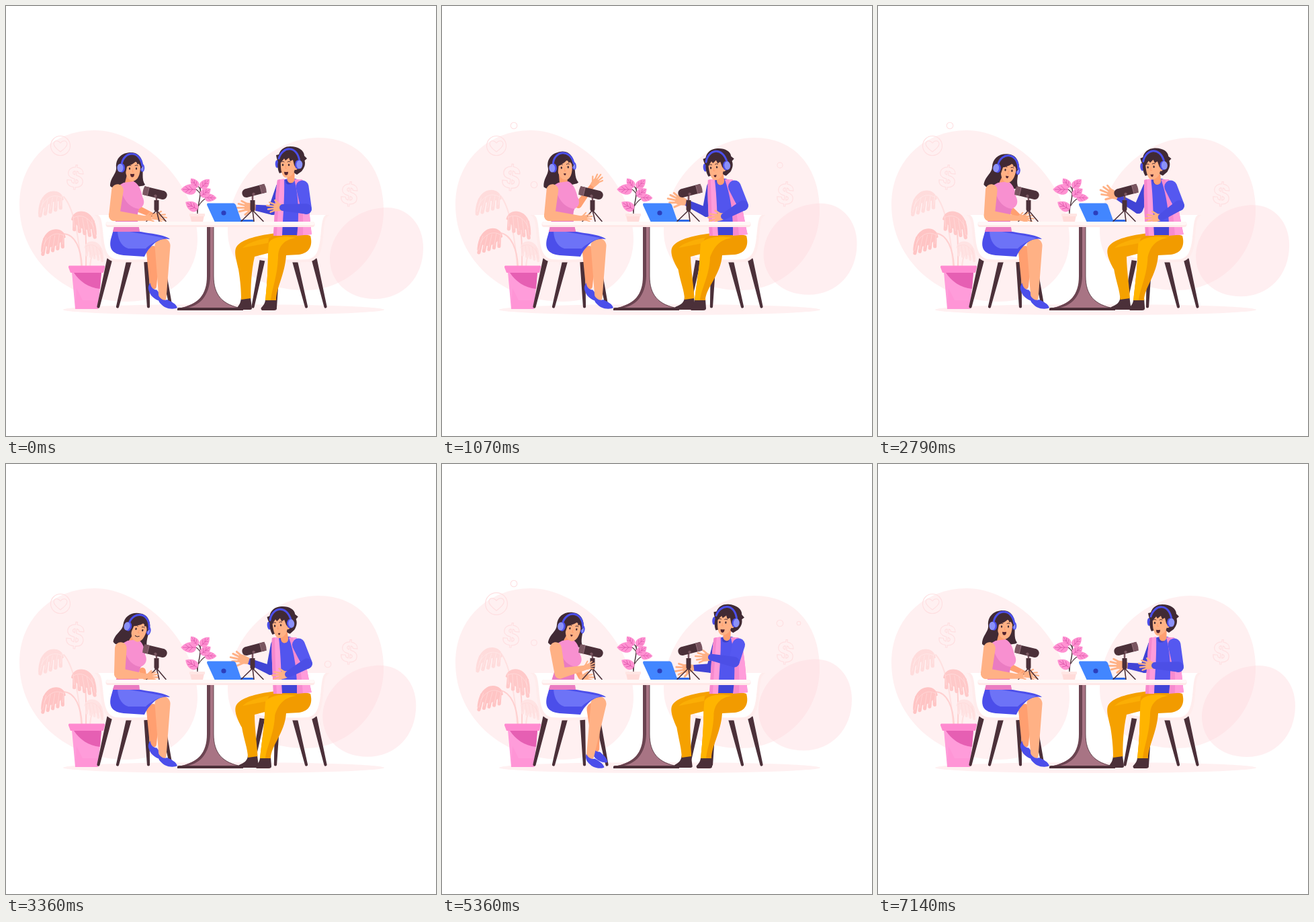
Recreate the animation shown at these times as an HTML page with a canvas. Size 640 px wide and 640 px high, loop 7.21 s.

```html
<!DOCTYPE html>
<html lang="en">
<head>
<meta charset="utf-8">
<title>Podcast</title>
<style>
html, body { margin: 0; width: 100%; height: 100%; overflow: hidden; background: #fff; }
canvas { display: block; width: 640px; height: 640px; }
</style>
</head>
<body>
<canvas id="stage" width="640" height="640"></canvas>
<script>
const canvas = document.getElementById('stage');
const ctx = canvas.getContext('2d');
const ratio = window.devicePixelRatio || 1;
canvas.width = canvas.height = Math.round(640 * ratio);

const LOOP = 7210, STEP = LOOP / 101;
const DARK = '#4b3039', HAIR = '#412a34', SKIN = '#ffb185', SKIN2 = '#ff9f70';
const BLUE = '#4b4eea', BLUE2 = '#4144d6', LILAC = '#8b91f9';
const PINK = '#ff9cda', PINK2 = '#ea7cc2', MIST = '#fff0f1', LINE = '#ffdfe1';

// ---------- drawing helpers ----------
function fill(color, path) {
  ctx.fillStyle = color;
  ctx.fill(new Path2D(path));
}

function stroke(color, width, path) {
  ctx.strokeStyle = color;
  ctx.lineWidth = width;
  ctx.stroke(new Path2D(path));
}

function oval(color, x, y, rx, ry = rx, turn = 0) {
  ctx.fillStyle = color;
  ctx.beginPath();
  ctx.ellipse(x, y, rx, ry, turn, 0, 7);
  ctx.fill();
}

function at(x, y, turn, scale, draw) {
  ctx.save();
  ctx.translate(x, y);
  ctx.rotate(turn);
  ctx.scale(scale, scale);
  draw();
  ctx.restore();
}

// A round-ended bar whose thickness changes along its length
function taper(color, [x1, y1], r1, [x2, y2], r2) {
  const a = Math.atan2(y2 - y1, x2 - x1) + Math.PI / 2;
  const c = Math.cos(a), s = Math.sin(a);
  ctx.fillStyle = color;
  ctx.beginPath();
  ctx.moveTo(x1 + c * r1, y1 + s * r1);
  ctx.arc(x1, y1, r1, a, a + Math.PI);
  ctx.lineTo(x2 - c * r2, y2 - s * r2);
  ctx.arc(x2, y2, r2, a + Math.PI, a);
  ctx.closePath();
  ctx.fill();
}

// Slides the upper body sideways while its foot line stays put
function leaning(dx, base, height, draw) {
  const k = dx / height;
  ctx.save();
  ctx.transform(1, 0, -k, 1, k * base, 0);
  draw();
  ctx.restore();
}

function hand([x, y], turn, scale, flip = 1) {
  at(x, y, turn, scale, () => {
    ctx.scale(1, flip);
    fill(SKIN, 'M-1 -3 C4 -4.500 8 -4.500 10 -3 L10 4 C7 5 3 4 -1 3Z');
    for (let i = 0; i < 4; i++) {
      const a = (i - 1.3) * 0.24;
      const len = 18 - Math.abs(i - 1.2) * 2;
      stroke(SKIN, 1.9, `M8 ${i * 2 - 2.7} L${Math.cos(a) * len} ${Math.sin(a) * len}`);
    }
    stroke(SKIN, 2, 'M3 -2.500 L9 -7.500');
  });
}

function mouth(x, y, open) {
  if (open < 0.12) return stroke(HAIR, 1, `M${x - 3} ${y} Q${x} ${y + 2} ${x + 3} ${y - 0.5}`);
  const w = 1.4 + 1.6 * open, h = 1.2 + 1.1 * open;
  fill('#55252f', `M${x - w} ${y - h} Q${x} ${y - h + 0.8} ${x + w} ${y - h} Q${x + w} ${y + h * 1.2} ${x} ${y + h * 1.2} Q${x - w} ${y + h * 1.2} ${x - w} ${y - h}Z`);
}

function face(x1, x2, y) {
  for (const x of [x1, x2]) {
    oval(HAIR, x, y, 1.2, 1.7);
    stroke(HAIR, 0.9, `M${x - 2} ${y - 4.5} Q${x} ${y - 6} ${x + 2} ${y - 4.5}`);
  }
  const m = (x1 + x2) / 2;
  stroke(SKIN2, 1, `M${m} ${y + 1} L${m - 1} ${y + 5} L${m + 1} ${y + 5}`);
}

// ---------- poses ----------
const mix = (a, b, u) => Array.isArray(a) ? a.map((v, i) => mix(v, b[i], u)) : a + (b - a) * u;
const smooth = u => u * u * (3 - 2 * u);
const TIMES = [0, 1070, 2070, 3360, 4430, 6210, 7140];

function segment(t, times) {
  let i = 0;
  while (i < times.length - 2 && t >= times[i + 1]) i++;
  return [i, Math.min(1, Math.max(0, (t - times[i]) / (times[i + 1] - times[i])))];
}

function poseAt(t, poses) {
  const [i, u] = segment(t, TIMES);
  const a = poses[i], b = poses[i + 1], out = {};
  for (const k in a) out[k] = mix(a[k], b[k], smooth(u));
  return out;
}

const wRest = {
  lean: 0, head: [187, 244, 0], mouth: 1,
  elbow: [161, 312], wrist: [206, 316], turn: -0.1,
  elbow2: [193, 300], wrist2: [219, 312], turn2: 0.22,
  foot: [233, 434, 0], foot2: [219, 417, 0.4], knee2: [219, 367]
};
const wPoint = { ...wRest, lean: -2, head: [181, 242.5, -0.1], mouth: 0.2,
  elbow: [160, 312], elbow2: [203, 296], wrist2: [224, 267], turn2: -0.85 };
const wListen = { ...wRest, lean: 6, head: [196, 248, 0.22], mouth: 0,
  elbow: [169, 312], wrist: [208, 316], elbow2: [203, 308], wrist2: [206, 317], turn2: 0.1 };
const wTouch = { ...wListen, lean: 4, head: [192, 246, 0.11],
  elbow: [184, 311], wrist: [214, 290], turn: -0.65, wrist2: [206, 317],
  foot: [219, 435, 0.08], foot2: [235, 428, 0.35], knee2: [227, 365] };
const wAnswer = { ...wListen, lean: 4, head: [194, 248, 0.18], mouth: 0.3, elbow: [168, 312],
  foot: [222, 435, 0.06], foot2: [224, 420, 0.2], knee2: [224, 365] };
const WOMAN = [wRest, wPoint, wRest, wListen, wTouch, wAnswer, wRest];

const mRest = {
  lean: 0, head: [420, 240, 0], mouth: 1,
  elbow: [447, 302], wrist: [412, 300], turn: 3.2,
  elbow2: [397, 304], wrist2: [370, 300], turn2: 3.2,
  ankle: 394, ankle2: 357
};
const mLean = { ...mRest, lean: -8, head: [408.5, 243.5, -0.12], mouth: 0.35,
  elbow: [448, 297], wrist: [420, 313], turn: 3,
  elbow2: [394, 307], wrist2: [362, 292], turn2: 3.42, ankle: 384, ankle2: 368 };
const mRaise = { ...mLean, lean: -7, head: [412, 242, -0.06], mouth: 0.9,
  wrist: [424, 316], elbow2: [378, 295], wrist2: [350, 270], turn2: 3.8, ankle: 391 };
const mPause = { ...mLean, mouth: 0.15, wrist2: [360, 293], ankle: 386, ankle2: 367 };
const mOpen = { ...mRest, lean: -3, head: [416, 241, -0.05],
  wrist: [412, 303], turn: 2.85, wrist2: [368, 298], ankle: 392, ankle2: 360 };
const mReach = { ...mRest, lean: 4, head: [425.7, 238, 0.18],
  elbow: [424, 288], wrist: [391, 274], turn: 3.4,
  elbow2: [404, 304], wrist2: [378, 308], turn2: 2.85, ankle2: 367 };
const MAN = [mRest, mLean, mRaise, mPause, mOpen, mReach, mRest];

// ---------- backdrop ----------
function pulse(t, from, to) {
  return smooth(Math.max(0, Math.min(1, (t - from) / 300, (to - t) / 300)));
}

function ring(x, y, r) {
  if (r < 0.2) return;
  ctx.strokeStyle = LINE;
  ctx.lineWidth = 1.1;
  ctx.beginPath();
  ctx.arc(x, y, r, 0, 7);
  ctx.stroke();
}

function dollar(x, y, turn, scale) {
  at(x, y, turn, scale, () => {
    ctx.font = '800 40px Inter, "Liberation Sans", sans-serif';
    ctx.textAlign = 'center';
    ctx.textBaseline = 'alphabetic';
    ctx.strokeStyle = LINE;
    ctx.lineWidth = 1.2;
    ctx.strokeText('$', 0, 14.5);
  });
}

function backdrop(t, sway) {
  fill(MIST, 'M132 185 C198 185 283 257 285 346 C285 406 238 439 180 440 C92 440 20 380 20 295 C20 230 70 185 132 185Z');
  fill(MIST, 'M465 196 C525 196 562 240 562 305 C562 370 510 423 445 423 C380 423 330 390 330 335 C330 260 395 196 465 196Z');
  const [i, u] = segment(t, [0, 4700, 7140]);
  const drift = i ? -15 * (1 - u) : -15 * u;
  at(551 + drift, 368 - 9.5 * sway, 0, 1, () =>
    fill('rgba(255, 214, 219, 0.38)', 'M16 -68 C48 -68 70 -42 70 -8 C70 36 40 68 -2 68 C-42 68 -69 42 -69 8 C-69 -32 -30 -68 16 -68Z'));

  const swell = pulse(t, 4050, 6700);
  at(81, 208, 0, 1 + 0.13 * swell, () => {
    ring(0, 0, 14.5);
    stroke(LINE, 1.1, 'M0 9 C-7 4 -10 0 -10 -3 C-9 -9 -3 -8 0 -4 C3 -8 9 -9 10 -3 C10 0 7 4 0 9Z');
  });
  dollar(103, 255, 0.1, 1 + 0.08 * (pulse(t, 500, 1600) + pulse(t, 2900, 3800)));
  dollar(511, 280, 0.1, 1 + 0.08 * pulse(t, 1600, 2600));

  const early = pulse(t, 300, 1500), late = swell;
  const top = Math.max(early, pulse(t, 2450, 3130), late);
  ring(107, 178, 4.8 * top);
  ring(137, 266, 4.8 * Math.max(early, late * 0.9));
  ring(503, 237, 4.8 * Math.max(early * 0.85, late));
  ring(531, 237, 2.8 * late);
  ring(73, 246, 4.2 * pulse(t, 1650, 2400));
  ring(545, 274, 4.8 * pulse(t, 1650, 2500));
  ring(479, 298, 4.8 * pulse(t, 2950, 3850));
  oval(MIST, 324, 452, 239, 8);
}

// An arched leaf with fingers hanging from its upper edge
function bigLeaf(x, y, turn, size, flip, color, vein, full) {
  at(x, y, turn, size, () => {
    ctx.scale(flip, 1);
    fill(color, 'M20 -7 C18 -20 4 -24 -7 -17 C-17 -10 -20 3 -20 17 C-14 6 -6 0 2 -3 C8 -5 15 -4 20 -7Z');
    if (full) oval(color, 0, -4, 17, 11, -0.5);
    for (let i = 0; i < 5; i++) {
      const fx = -14 + 7.2 * i, ex = -17 + 8 * i, ey = 18 - 3 * i + full * 2;
      stroke(color, 5.6, `M${fx} ${-4 - 2 * i} Q${fx} ${ey * 0.3} ${ex} ${ey}`);
      stroke(vein, 0.7, `M${fx + 2} ${-7 - 1.5 * i} L${ex} ${ey - 4}`);
    }
    stroke(vein, 0.8, 'M17 -10 C6 -17 -8 -12 -15 4');
  });
}

function pottedPlant(s) {
  stroke('#ffe0e0', 2, `M${86 + 2 * s} ${284 - 2 * s} Q105 305 112 388`);
  stroke('#ffd0d0', 2, `M${86 + s} ${339 - 2 * s} C103 340 112 362 113 388`);
  stroke('#ffd0d0', 2, `M${117 - 3 * s} 312 Q120 350 119 388`);
  stroke('#ffe0e0', 2, 'M138 356 Q126 367 125 388');
  bigLeaf(131, 365, 0, 0.72, -1, '#ffe3e3', '#ffd5d5', 1);
  bigLeaf(67 + 3.5 * s, 295 - 3 * s, 0.08 * s, 0.95, 1, '#ffdcdc', '#ffeaea', 0);
  bigLeaf(116 - 3 * s, 325, 0.08 * s, 0.95, -1, '#ffc9c9', '#ffdede', 1);
  bigLeaf(70.5 + 1.5 * s, 351 - 2.5 * s, 0.08 * s, 0.92, 1, '#ffc4c4', '#ffdcdc', 1);
  fill(PINK, 'M98 396 H142 L137 451 H103Z');
  fill('#ff95d6', 'M105 420 L114 438 H139 L137 451 H103Z');
  fill('#e65fb3', 'M101 397 H142 L140 421 C122 419 110 410 101 397Z');
  fill('#ff8ad0', 'M94 386.5 H146 Q148 387 147 389 L145 397 H96 L93 389 Q92.500 387 94 386.500Z');
}

// ---------- furniture ----------
function chair(mirrored) {
  ctx.save();
  if (mirrored) ctx.transform(-1, 0, 0, 1, 613, 0);
  for (const [x, y, x2] of [[154, 378, 137.5], [183.5, 378, 166], [209, 376, 212], [231, 376, 245.5]])
    taper(DARK, [x, y], 4, [x2, 447.5], 2.1);
  fill('#ffecec', 'M131 311 H175 V360 L240 367 Q243 374 236 378 C215 382 185 382 163 381 C148 379 143 366 141 345 C139 326 140 315 131 311Z');
  fill('#fff', 'M137 311 H175 V360 L239 367 Q239 372 234 374 C212 378 185 378 164 377 C151 375 147 363 145 344 C143 326 143 315 137 311Z');
  ctx.restore();
}

function tableLeg() {
  fill('#a87484', 'M300 328 H309 V402 C309 430 322 445 352 450 H256 C286 445 300 430 300 402Z');
  fill('#6b4451', 'M299 328 H304 V402 C303 432 288 447 266 450 H256 C286 445 299 430 299 402Z');
  stroke(DARK, 0.8, 'M309 329 V402 C309 430 322 445 351 450');
  fill(DARK, 'M255 450 Q256 449 258 449 H350 L353 451 V453 H255Z');
}

function tableTop() {
  fill('#ffe9e8', 'M152 321 H456 Q459.500 321 459.500 325 Q459.500 329 456 329 H152 Q148.500 329 148.500 325 Q148.500 321 152 321Z');
  fill('#fff8f7', 'M152 321 H456 Q459 321 459 324 L458 326 H150 L149 324 Q149 321 152 321Z');
}

function tripod(x, feet) {
  for (const f of feet) stroke(DARK, 1.6, `M${x} 304 L${f} 320.500`);
  fill(DARK, `M${x - 3.5} 289 H${x + 3.5} V303 L${x + 2} 306 H${x - 2} L${x - 3.5} 303Z`);
  stroke('#7a5661', 2.6, `M${x} 282 V288`);
}

function micBody(x, y, turn, mirrored) {
  at(x, y, turn, 1, () => {
    if (mirrored) ctx.scale(-1, 1);
    fill(DARK, 'M-17 -6.500 H13 Q18.500 -5 18.500 0 Q18.500 5 13 6.500 H-17Z');
    fill('#7a5661', 'M-17 -6.500 H-10 V6.500 H-17 Q-19 0 -17 -6.500Z');
    stroke('#9c7682', 0.8, 'M-10 -6 V6');
    oval('#7a5661', 2, 4, 2.2);
  });
}

function laptop() {
  fill('#2e69e6', 'M346 318 H367 Q370 319 368.500 322 H345Z');
  fill('#4286ff', 'M300 293.500 H339 Q341 294 342 296 L351 322 H311 L299 296 Q299 294 300 293.500Z');
  oval('#2c3fbd', 324, 308, 3.6);
}

function deskPlant() {
  stroke(DARK, 1.4, 'M285 310 C284 297 291 287 289 270');
  stroke(DARK, 1.1, 'M287 297 Q291 290 298 286 M289 280 Q286 274 281 272 M289 273 L286 268 M290 278 L293 274 M285 306 L283 302');
  const leaves = [[285, 270, -2.2, 0.95], [290, 271, -0.8, 1.05], [283, 273, 3.14, 1.3],
    [290, 283, -0.65, 1.05], [296, 285, 0.05, 1], [285, 303, 3.7, 1.2]];
  for (const [x, y, turn, scale] of leaves) at(x, y, turn, scale, () => {
    fill('#ff92d2', 'M0 0 C0 -8 11 -8 17.500 0 C11 8 0 8 0 0Z');
    stroke('#df5aae', 0.7, 'M0 0 H15 M4 0 L8 -4 M4 0 L8 4 M8 0 L12 -3 M8 0 L12 3');
  });
  fill('#ffdcda', 'M274 312 H295 L293 321 H276Z');
  fill('#ffe6e4', 'M273 309 H296 V313 H273Z');
}

// ---------- people ----------
function shoe([x, y, turn]) {
  at(x, y, turn, 1, () =>
    fill(BLUE, 'M-6 -3 C-8 5 -4 9 3 14 C11 18 19 17 22 15 C20 9 13 6 7 3 C1 5 -3 2 -6 -3Z'));
}

function womanLegs(p) {
  taper(SKIN2, p.knee2, 10, p.foot2, 5);
  shoe(p.foot2);
  taper(SKIN, [233, 357], 11.5, p.foot, 5.6);
  shoe(p.foot);
  fill(BLUE, 'M160 333 C180 332 198 336 212 338 C228 340 240 343 244 347 C234 345 224 349 217 357 C211 363 209 367 206 373 L175 371 C158 369 153 361 156 347Z');
  fill('#6d73f7', 'M166 333 C182 336 206 339 236 345.500 C224 349 214 355 208 361 L182 361 C170 357 166 345 166 333Z');
}

function womanHead(p) {
  at(p.head[0], p.head[1], p.head[2], 1, () => {
    oval(BLUE, 16, -3, 3.2, 6);
    oval(LILAC, 16, -3, 1.6, 4.6);
    fill(SKIN, 'M-10 -8 C-10 7 -6 16 2 16.500 C9 16 13 7 13 -5 C10 -15 -7 -15 -10 -8Z');
    fill(HAIR, 'M-15 2 C-17 -15 -9 -25 0 -25.500 C10 -25 16 -17 16.500 -6 L13.500 -1 L12 -11 L8.500 -8 L7 -14 C4 -9 -3 -7 -7 -5 L-9 5Z');
    face(-3, 7, -2);
    mouth(1, 8, p.mouth);
    stroke(BLUE, 3, 'M-15 -8 C-12 -29 13 -30 16 -6');
    oval(BLUE, -14.5, -3, 4.6, 6.8);
    oval(LILAC, -17, -3, 4.5, 6.2);
  });
}

function womanBody(p) {
  at(p.head[0], p.head[1], p.head[2], 1, () =>
    fill(HAIR, 'M-1 -26 C-15 -26 -24 -17 -23 -4 C-22 6 -32 11 -32 24 Q-28 28 -24 26 L-12 28 L14 24 Q18 24 20 22 C14 14 18 3 16 -12 C13 -22 7 -26 -1 -26Z'));
  taper(SKIN2, p.elbow2, 5, p.wrist2, 3.5);
  hand(p.wrist2, p.turn2, 1.15);
  taper(SKIN2, [p.head[0] - 1, p.head[1] + 8], 6, [183 + p.lean, 264], 6);
  leaning(p.lean, 334, 72, () => {
    fill('#f890d0', 'M175 263 L190 261 C198 265 201 274 203 284 C207 291 206 298 198 302 C195 308 196 314 196 320 L199 336 H159 L167 305 C170 290 165 275 168 267Z');
    fill(PINK2, 'M172 276 C176 292 187 301 198 302 C195 308 196 314 196 320 L199 336 H159 L167 305 C170 292 170 284 172 276Z');
  });
  womanHead(p);
}

function womanArm(p) {
  taper(SKIN, [166 + p.lean * 0.8, 274], 8.8, p.elbow, 8);
  taper(SKIN, p.elbow, 8, p.wrist, 3.8);
  hand(p.wrist, p.turn, 1);
}

function manLegs(p) {
  const a = p.ankle2, b = p.ankle;
  const shin = (a - 357) / 2, knee = (b - 394) * 0.6;
  fill(DARK, `M${a - 7} 434 H${a + 7} L${a + 9} 450 Q${a + 9} 452 ${a + 5} 452 H346 C342 446 ${a - 8} 448 ${a - 7} 434Z`);
  fill('#f5a100', `M404 338 C375 341 352 347 344 357 C338 364 343 378 ${346 + shin} 392 C${349 + shin} 410 ${a - 7} 424 ${a - 7} 437 L${a + 7.5} 435 C${a + 7} 420 ${365 + shin} 395 370 373 L405 364Z`);
  fill('#fbae05', 'M400 344 C378 346 359 353 352 360 C366 357 384 354 398 351Z');
  fill(DARK, `M${b - 8} 436 H${b + 8} L${b + 9} 450 Q${b + 9} 453 ${b + 5} 453 H${b - 13} C${b - 18} 448 ${b - 8} 448 ${b - 8} 436Z`);
  fill('#f29b00', `M391 346 C405 336 440 338 453 342 C457 356 452 368 436 370 L417 371 C415 400 ${b + 8} 420 ${b + 8} 438 L${b - 8} 438 C${b - 5} 410 ${390 + knee} 388 ${390 + knee} 365Z`);
  fill('#ffb400', `M${391 + knee} 353 C396 343 412 342 432 345 C414 347 405 358 ${405 + knee} 374 C${404 + knee} 402 ${b + 2} 420 ${b} 438 H${b - 8} C${b - 5} 410 ${390 + knee} 388 ${390 + knee} 365Z`);
}

function manHead(p) {
  at(p.head[0], p.head[1], p.head[2], 1, () => {
    oval(BLUE, -16.5, -5, 2.8, 6);
    fill(HAIR, 'M-17 -13 L-18 -18 L-14 -19 C-11 -28 -4 -31 3 -31 C15 -31 24 -25 24 -17 L28 -13 L24.500 -10 C26 -4 24 1 20 6 L13 11 L8 8 H-10 L-13 9 C-16 3 -16 -4 -15 -8Z');
    taper(SKIN2, [4, 10], 5.5, [4, 18], 5.5);
    fill(SKIN, 'M-11 -12 C-12 6 -9 15 -3 15.500 C4 15 10 9 11 -3 L10 -14 Q-2 -20 -11 -12Z');
    oval(SKIN, 11, 0, 3, 4);
    fill(HAIR, 'M-14 -4 L-15 -15 C-5 -24 9 -23 15 -12 L12 2 L9 -3 L7 -11 L3 -9 L1 -14 L-4 -10 L-6 -13 L-11 -7Z');
    face(-8, 1, -3.5);
    mouth(-3, 9, p.mouth);
    stroke(BLUE, 3, 'M-14 -13 C-9 -31 13 -34 17 -9');
    oval(BLUE, 14.5, -4, 4.4, 6.8);
    oval(LILAC, 16.8, -4, 4.5, 6.3);
  });
}

function manBody(p) {
  taper(BLUE2, [409 + p.lean, 269], 7, p.elbow2, 7);
  taper(BLUE2, p.elbow2, 7, p.wrist2, 4.4);
  hand(p.wrist2, p.turn2, 1.5);
  leaning(p.lean, 342, 82, () => {
    fill('#5255ee', 'M411 260 Q424 253 436 259 L441 300 L437 341 H408 L410 290Z');
    fill(BLUE2, 'M409 329 H437 V341 H408Z');
    fill('#3d40c6', 'M415 258 Q421 262 428 257 L426 264 Q421 267 417 264Z');
    fill(PINK, 'M404 259 L414 257 C415 285 412 315 411 342 H398 C400 315 400 285 404 259Z');
    fill('#f689cd', 'M404 259 L408 258 C406 288 404 318 403 342 H398 C400 315 400 285 404 259Z');
    fill('#f68bcf', 'M429 258 L440 258 C449 266 451 305 455 340 L433 342 C437 310 435 280 429 258Z');
    fill(PINK, 'M435 258 L440 258 C449 266 451 305 455 340 L442 341 C443 310 441 280 435 258Z');
  });
  manHead(p);
}

function manArm(p) {
  hand(p.wrist, p.turn, 1.35, -1);
  taper('#5558f0', [441 + p.lean * 0.7, 269], 9.5, p.elbow, 8);
  taper('#4c4fe6', p.elbow, 7.8, p.wrist, 5);
}

// ---------- scene ----------
function scene(t) {
  ctx.setTransform(ratio, 0, 0, ratio, 0, 0);
  ctx.lineCap = ctx.lineJoin = 'round';
  ctx.fillStyle = '#fff';
  ctx.fillRect(0, 0, 640, 640);

  const sway = (1 - Math.cos(t / 7140 * Math.PI * 4)) / 2;
  const woman = poseAt(t, WOMAN), man = poseAt(t, MAN);
  backdrop(t, sway);
  pottedPlant(sway);
  chair(false);
  chair(true);
  womanLegs(woman);
  womanBody(woman);
  manLegs(man);
  manBody(man);
  tableLeg();
  deskPlant();
  laptop();
  tripod(224, [209, 228, 238]);
  micBody(221.5, 278.5, 0.24, false);
  tripod(367, [350, 369, 383]);
  micBody(369.5, 275.5, -0.26, true);
  womanArm(woman);
  manArm(man);
  tableTop();
}

function tick(now) {
  const t = now % LOOP;
  scene(Math.floor((t + 3) / STEP) % 101 * STEP);
  requestAnimationFrame(tick);
}
requestAnimationFrame(tick);
</script>
</body>
</html>
```
